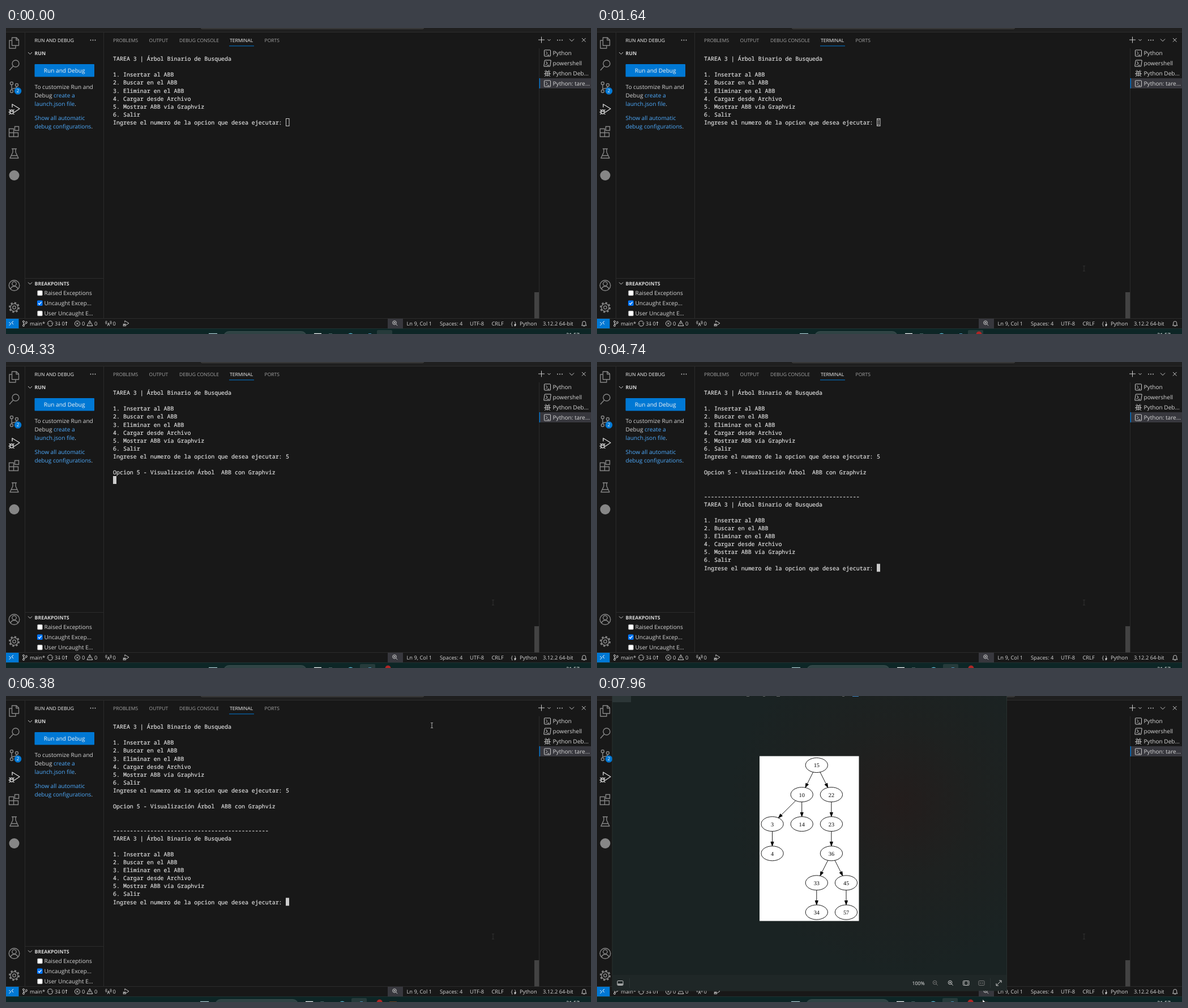
An HTML page that plays this animation: 1033 px wide and 542 px high, repeating every 8 s.

```html
<!DOCTYPE html>
<html lang="es">
<head>
<meta charset="utf-8">
<title>Terminal</title>
<style>
html, body { margin: 0; width: 100%; height: 100%; overflow: hidden; background: #181818; }
svg { display: block; width: 1033px; height: 542px; }
text { font: 10.1px "Open Sans", "Noto Sans", sans-serif; fill: #d6d6d6; white-space: pre; text-rendering: geometricPrecision; }
.tab { font-size: 8.55px; fill: #a4a4a4; }
.on { fill: #f4f4f4; }
.head { font-size: 8.8px; font-weight: 700; }
.link { fill: #4daafc; }
.bar { font-size: 9.3px; }
.mid { text-anchor: middle; }
.term { font: 9.967px "Noto Sans Mono", "DejaVu Sans Mono", monospace; fill: #e2e2e2; stroke: #e2e2e2; stroke-width: .18; }
.node { font: 10.2px "Liberation Serif", serif; fill: #000; text-anchor: middle; }
.line { fill: none; stroke: #ccc; stroke-width: 1; }
.side { fill: none; stroke: #868686; stroke-width: 1.4; }
.rule { fill: none; stroke: #2b2b2b; }

/* one loop = 8 s, so 1% = 80 ms */
.a { animation: 8s step-end infinite; }
#rec { animation-name: rec; }
#hollow { animation-name: hollow; }
#ready { animation-name: ready; }
#five { animation-name: five; }
#block5 { animation-name: block5; }
#output { animation-name: output; }
#wait { animation-name: wait; }
#menu2 { animation-name: menu2; }
#solid2 { animation-name: solid2; }
#hollow2 { animation-name: hollow2; }
#trail1 { animation-name: trail1; }
#trail2 { animation-name: trail2; }
#focusA { animation-name: focusA; }
#focusB { animation-name: focusB; }
#newApp { animation-name: newApp; }
#click1 { animation-name: click1; }
#click2 { animation-name: click2; }
#viewer { animation-name: viewer; }
#pointer { animation-name: pointer; }
#beam { animation-name: beam; }
#arrow { animation-name: arrow; }
#mouse { animation: move 8s linear infinite; }
#apps { animation: slide 8s linear infinite; }

@keyframes rec { 0% { opacity: 0 } 1.63% { opacity: .4 } 3.37% { opacity: 1 } }
@keyframes hollow { 0% { opacity: 1 } 23.1% { opacity: 0 } }
@keyframes ready { 0% { opacity: 0 } 23.1% { opacity: 1 } 36.5% { opacity: 0 } }
@keyframes five { 0% { opacity: 0 } 36.5% { opacity: 1 } }
@keyframes block5 { 0% { opacity: 0 } 36.5% { opacity: 1 } 54.1% { opacity: 0 } }
@keyframes output { 0% { opacity: 0 } 54.1% { opacity: 1 } }
@keyframes wait { 0% { opacity: 0 } 54.1% { opacity: 1 } 57.5% { opacity: 0 } }
@keyframes menu2 { 0% { opacity: 0 } 57.5% { opacity: 1 } }
@keyframes solid2 { 0% { opacity: 0 } 57.5% { opacity: 1 } 97.87% { opacity: 0 } }
@keyframes hollow2 { 0% { opacity: 0 } 97.87% { opacity: 1 } }
@keyframes trail1 { 0% { opacity: 0 } 8.8% { opacity: 1 } }
@keyframes trail2 { 0% { opacity: 0 } 85% { opacity: 1 } }
@keyframes focusA { 0% { opacity: 1 } 23.8% { opacity: 0 } }
@keyframes focusB { 0% { opacity: 0 } 23.8% { opacity: 1 } }
@keyframes newApp { 0% { opacity: 0 } 64.3% { opacity: 1 } 91.7% { opacity: .4 } }
@keyframes click1 { 0% { opacity: 0 } 22.25% { opacity: 1 } 23.87% { opacity: 0 } }
@keyframes click2 { 0% { opacity: 0 } 97.87% { opacity: 1 } 99.5% { opacity: 0 } }
@keyframes viewer { 0% { opacity: 0 } 99.5% { opacity: 1 } }
@keyframes pointer { 0% { opacity: 0 } 6% { opacity: 1 } 33.25% { opacity: 0 } 76.1% { opacity: 1 } }
@keyframes beam { 0% { opacity: 1 } 31.4% { opacity: 0 } 76.1% { opacity: 1 } 85.6% { opacity: 0 } }
@keyframes arrow { 0% { opacity: 0 } 31.4% { opacity: 1 } 76.1% { opacity: 0 } 85.6% { opacity: 1 } }
@keyframes move {
  0%, 6% { transform: translate(1003px, 536px) }
  15.25%, 16.1% { transform: translate(522px, 178px) }
  20%, 27.25% { transform: translate(497px, 167px) }
  28.5% { transform: translate(455px, 156px) }
  33.25%, 76% { transform: translate(-4px, 500px) }
  76.1% { transform: translate(738px, 30px) }
  79.7%, 80.6% { transform: translate(752px, 52px) }
  85% { transform: translate(664px, 487px) }
  86%, 100% { transform: translate(681px, 537.5px) }
}
@keyframes slide {
  0%, 57.5% { transform: none }
  59%, 62% { transform: translateX(-14px) }
  63.5%, 100% { transform: translateX(-14.8px) }
}
</style>
</head>
<body>
<svg viewBox="0 0 1033 542">
  <defs>
    <radialGradient id="tint" gradientUnits="userSpaceOnUse" cx="535" cy="190" r="300">
      <stop offset="0" stop-color="#231d1c"/><stop offset=".45" stop-color="#1e2120"/><stop offset="1" stop-color="#1a2323"/>
    </radialGradient>
    <g id="bug">
      <path d="M-4-3.500V-9L9-1 0 5" stroke-linejoin="round"/>
      <ellipse cx="-5" cy="4.500" rx="2.900" ry="3.600"/>
      <path d="M-8 3.500h6M-9.500.500l2 1.500M-.500.500l-2 1.500M-10.500 5h2.500M-2 5H.500M-9.500 9l2-1.500M-.500 9l-2-1.500"/>
    </g>
    <g id="shell"><rect x="-5.5" y="-5.5" width="11" height="11" rx="1"/><path d="M-3-3 0 0-3 3M0 3.500h3.500"/></g>
    <g id="lens"><circle r="3.300"/><path d="M2.400 2.400 5.200 5.200M-1.600 0h3.200"/></g>
  </defs>

  <rect width="1033" height="542" fill="#181818"/>
  <rect width="1033" height="7" fill="#1f1f1f"/>
  <path d="M344-2v1q0 2.500 3 2.500h388q3 0 3-2.500v-1" fill="#2a2a2a" stroke="#484848"/>
  <path class="rule" d="M0 7.500h1033M33.500 8v506M172.500 8v506M941.500 36v478M34 443.500h138M0 514.500h1033"/>

  <!-- activity bar -->
  <g class="side">
    <path d="M10.500 21v-4h8l4 4v10h-12zM18 17v4.500h4.500M10.500 22H6v14h11v-5" stroke-linejoin="round"/>
    <circle cx="17" cy="63" r="6"/><path d="M12.700 67.500 6 75"/>
    <circle cx="10" cy="98" r="2.500"/><circle cx="10" cy="112" r="2.500"/><circle cx="19" cy="101" r="2.500"/>
    <path d="M10 100.500v9M19 103.500q0 4-9 4"/>
    <path d="M5.500 178.500h8v14h-8zM5.500 185.500h16v7h-8M15.500 174.500h7v7h-7z"/>
    <path d="M10 214h9M12 214v6L7 230.500h15L17 220v-6M9.500 226h10" stroke-linejoin="round"/>
    <circle cx="14.500" cy="456" r="9.300"/><circle cx="14.500" cy="453" r="3.700"/><path d="M8 462.500q1.500-5 6.500-5t6.500 5"/>
    <circle cx="14.500" cy="495" r="2.700"/><circle cx="14.500" cy="495" r="6.600"/>
    <circle cx="14.500" cy="495" r="8.300" stroke-width="2.500" stroke-dasharray="3.260"/>
  </g>
  <use href="#bug" x="15" y="144" fill="none" stroke="#d7d7d7" stroke-width="1.400"/>
  <circle cx="14.500" cy="261" r="9" fill="#868686"/>
  <circle cx="21" cy="111.500" r="6.300" fill="#0078d4"/>

  <!-- side bar -->
  <rect x="50.500" y="64" width="105.500" height="22.500" rx="1" fill="#0078d4"/>
  <path class="line" d="M39 43l3.500 3.500L46 43M39 450.500l3.500 3.500 3.500-3.500"/>
  <g fill="#ccc"><circle cx="149.500" cy="21.500" r=".9"/><circle cx="153.500" cy="21.500" r=".9"/><circle cx="157.500" cy="21.500" r=".9"/></g>
  <g fill="#fff" stroke="#767676" stroke-width=".7">
    <rect x="55.400" y="465" width="9" height="9" rx="1.500"/><rect x="55.400" y="501" width="9" height="9" rx="1.500"/>
  </g>
  <rect x="55" y="482.500" width="9.600" height="9.600" rx="1.500" fill="#0075ff"/>
  <path d="M57 487.500l2 2 3.600-4.300" fill="none" stroke="#fff" stroke-width="1.200"/>

  <!-- panel -->
  <rect x="394" y="31.300" width="44" height="1" fill="#0078d4"/>
  <path class="line" d="M940 21h11M945.500 15.500v11M956.500 20l2.500 2.500 2.500-2.500M995 19.500l4 4 4-4M1017 18l6.500 6.500M1023.500 18l-6.500 6.500"/>
  <g fill="#ccc"><circle cx="974" cy="21.500" r=".9"/><circle cx="978" cy="21.500" r=".9"/><circle cx="982" cy="21.500" r=".9"/></g>
  <rect x="942" y="89" width="91" height="18" fill="#37373d"/>
  <rect x="941.600" y="89" width="1.400" height="18" fill="#0078d4"/>
  <g class="line">
    <use href="#shell" x="956" y="44.500"/><use href="#shell" transform="translate(956 62.500) skewX(-8)"/><use href="#shell" x="956" y="98.500"/>
    <circle cx="956" cy="81" r="3.800"/><path d="M952 81h8M956 77v8M953 74.500l1.500 2.500M959 74.500l-1.500 2.500M950 81h2M960 81h2M951 76l2 2M961 76l-2 2M951 86l2-2M961 86l-2-2"/>
  </g>
  <rect x="933" y="468" width="8" height="46.500" fill="#434343"/>

  <!-- status bar -->
  <rect y="515" width="22.500" height="17.500" fill="#0078d4"/>
  <rect x="674" y="515" width="27" height="17.500" fill="#37373d"/>
  <path class="line" style="stroke:#fff" d="M5.500 521l3 3-3 3M13 519l-3 3 3 3"/>
  <g class="line">
    <circle cx="31" cy="520" r="1.500"/><circle cx="31" cy="527" r="1.500"/><circle cx="36" cy="521.500" r="1.500"/><path d="M31 521.500v4M36 523q0 1.500-5 1.500"/>
    <path d="M73.500 523a4.500 4.500 0 0 1 8.600-1.500M82.500 524a4.500 4.500 0 0 1-8.600 1.500M83.500 522l-1.400 1.500-2-1M72.500 525l1.400-1.500 2 1"/>
    <path d="M94 520v6.500M92.200 524.800l1.800 1.800 1.800-1.800M106.500 527v-6.500M104.700 522.200l1.800-1.800 1.800 1.800"/>
    <circle cx="126" cy="523.500" r="4.600"/><path d="M124 521.500l4 4M128 521.500l-4 4"/>
    <path d="M148 518.500l5 9h-10zM148 521.500v3.500"/>
    <path d="M181 522l-2 6M181 522l2 6M180 525.500h2M178.800 524a2.600 2.600 0 0 1 0-4.500M183.200 524a2.600 2.600 0 0 0 0-4.500M177 525a5 5 0 0 1 0-6.500M185 525a5 5 0 0 0 0-6.500" stroke-width=".85"/>
    <use href="#bug" transform="translate(212 523.500) scale(.55)" stroke-width="1.800"/>
    <use href="#lens" x="686" y="522"/><path d="M686 520.400v3.200"/>
    <path d="M1016.500 527h8.500l-1.300-2v-2.500a3 3 0 0 0-6 0v2.500zM1019.500 528h2.500"/>
  </g>
  <circle cx="899" cy="526" r="1.700" fill="#ccc"/>
  <g id="labels"></g>

  <!-- terminal -->
  <g id="menu1"></g>
  <rect class="line a" id="hollow" x="494.500" y="160.500" width="5.500" height="13"/>
  <rect class="a" id="ready" x="494" y="160" width="6" height="14" fill="#ccc"/>
  <g class="a" id="five"></g>
  <rect class="a" id="block5" x="500" y="160" width="6" height="14" fill="#ccc"/>
  <g class="a" id="output"></g>
  <rect class="a" id="wait" x="189" y="202" width="6" height="14" fill="#ccc"/>
  <g class="a" id="menu2"></g>
  <rect class="a" id="solid2" x="494" y="357.500" width="6" height="14" fill="#ccc"/>
  <rect class="line a" id="hollow2" x="494.500" y="358" width="5.500" height="13"/>
  <path class="a" id="trail1" d="M858 421.500h4M860 421.500v9M858 430.500h4" fill="none" stroke="#303030"/>
  <path class="a" id="trail2" d="M659 490.500h4M661 490.500v8M659 498.500h4" fill="none" stroke="#2a2a2a"/>

  <!-- image window -->
  <g class="a" id="viewer">
    <rect x="27" y="-2" width="696.500" height="524" fill="url(#tint)" stroke="#303938" stroke-width=".7"/>
    <path d="M27 0h33v11h-33z" fill="#2c3637"/>
    <path d="M264 0h5M293 0h4M317 0h6M433 0h4" stroke="#aaa" stroke-width="1.200"/>
    <rect x="451" y="0" width="11" height="1" fill="#3f87c8"/>
    <rect x="27" y="494" width="696" height="28" fill="#1f2727"/>
    <path d="M57.500 500v17M694.500 500v17" stroke="#2c3434"/>
    <g class="line" stroke-width="1.100">
      <rect x="36" y="504.500" width="10" height="8" rx="1.200"/><path d="M36.500 510.500h9" stroke-width="2"/>
      <g stroke="#777"><use href="#lens" x="596.500" y="507.500"/><rect x="674" y="504.500" width="10" height="8" rx="1.200"/><path d="M677 507v3M681 507v3M679 507.500v.6M679 509.300v.6"/></g>
      <use href="#lens" x="623.500" y="507.500"/><path d="M623.500 505.900v3.200"/>
      <rect x="646.500" y="504.500" width="10.500" height="8" rx="1.200"/><path d="M648.500 508v-1.500h1.500M653.500 506.500h1.500v1.500M655 509v1.500h-1.500M650 510.500h-1.500v-1.500"/>
      <path d="M705 513l9-9M710 504h4v4M705 509v4h4"/>
    </g>
    <text x="556.500" y="511.500" style="font-size:8.700px;fill:#eee">100%</text>
    <rect x="287" y="106.500" width="175.500" height="292" fill="#fff"/>
    <g id="tree"></g>
  </g>

  <!-- taskbar -->
  <rect y="532.500" width="1033" height="10" fill="#0d2626"/>
  <path d="M0 532.500h1033" stroke="#263938" stroke-width=".7"/>
  <g id="apps">
    <rect x="358" y="540.800" width="15" height="2" fill="#a9cbd2"/>
    <rect x="384.500" y="537.500" width="146" height="18" rx="9" fill="#2f4344" stroke="#4b5d5e" stroke-width=".7"/>
    <rect class="a" id="focusA" x="655" y="535" width="27" height="12" rx="2" fill="#263b3b"/>
    <rect class="a" id="focusB" x="625" y="535" width="27" height="12" rx="2" fill="#263b3b"/>
    <rect x="544" y="540.700" width="13" height="2" fill="#e8eeee"/>
    <rect x="570" y="541.200" width="6" height="2" fill="#587070"/>
    <circle cx="608.500" cy="547" r="6.500" fill="#57b3cc"/>
    <rect x="640" y="541" width="5" height="2" fill="#4d8fb4"/>
    <circle class="a" id="rec" cx="674.500" cy="542.500" r="5" fill="#b02626"/>
  </g>
  <rect class="a" id="newApp" x="677" y="541" width="13" height="2" fill="#6a3d1e"/>
  <text class="bar" x="989" y="547" style="fill:#fff">21:57</text>

  <circle class="a" id="click1" cx="497" cy="167" r="8" fill="#d9cd18" opacity=".8"/>
  <circle class="a" id="click2" cx="681" cy="537" r="8" fill="#b9b014"/>
  <g class="a" id="pointer"><g id="mouse">
    <path class="a" id="beam" d="M-2-4.500h1.500L0-4l.5-.5H2M0-4v8M-2 4.500h1.500L0 4l.5.5H2" fill="none" stroke="#c4c4c4" stroke-width=".9"/>
    <path class="a" id="arrow" d="M0 0v11l2.600-2.400 1.700 3.800 1.500-.7-1.700-3.700h3.500z" fill="#fff" stroke="#222" stroke-width=".5"/>
  </g></g>
</svg>
<script>
const $ = id => document.getElementById(id);
const label = (x, y, s, cls = "") => `<text x="${x}" y="${y}" class="${cls}">${s}</text>`;

$("labels").innerHTML = [
  [50.5, 24.7, "RUN AND DEBUG", "tab on"],
  [50.5, 47.8, "RUN", "head"],
  [103.2, 79.2, "Run and Debug", "mid on"],
  [50.5, 107.8, "To customize Run and"],
  [50.5, 122.8, 'Debug <tspan class="link">create a</tspan>'],
  [50.5, 138, '<tspan class="link">launch.json file</tspan>.'],
  [50.5, 163, "Show all automatic", "link"],
  [50.5, 178.2, 'debug configurations<tspan fill="#ccc">.</tspan>', "link"],
  [50.5, 455.6, "BREAKPOINTS", "head"],
  [67.5, 473.4, "Raised Exceptions"],
  [67.5, 491.3, "Uncaught Excep..."],
  [67.5, 509.2, "User Uncaught E..."],
  [21, 114.3, "2", "tab mid on"],
  [189, 24.7, "PROBLEMS", "tab"],
  [252.5, 24.7, "OUTPUT", "tab"],
  [306, 24.7, "DEBUG CONSOLE", "tab"],
  [395, 24.7, "TERMINAL", "tab on"],
  [456.5, 24.7, "PORTS", "tab"],
  [965.5, 48.2, "Python"],
  [965.5, 66.2, "powershell"],
  [965.5, 84.2, "Python Deb..."],
  [965.5, 102.2, "Python: tare..."],
  [42, 527, "main*", "bar"],
  [86, 527, "3", "bar"],
  [98.5, 527, "0", "bar"],
  [134, 527, "0", "bar"],
  [156, 527, "0", "bar"],
  [188.5, 527, "0", "bar"],
  [707.5, 527, "Ln 9, Col 1", "bar"],
  [766, 527, "Spaces: 4", "bar"],
  [819, 527, "UTF-8", "bar"],
  [857.5, 527, "CRLF", "bar"],
  [891.5, 526.5, "{ }", "bar"],
  [907, 527, "Python", "bar"],
  [948, 527, "3.12.2 64-bit", "bar"]
].map(row => label(...row)).join("");

// terminal text on a fixed character grid
const term = (row, s, col = 0) => label(189 + col * 5.98, 58.1 + row * 14.11, s, "term");
const menu = [
  "TAREA 3 | Árbol Binario de Busqueda", "",
  "1. Insertar al ABB", "2. Buscar en el ABB", "3. Eliminar en el ABB",
  "4. Cargar desde Archivo", "5. Mostrar ABB vía Graphviz", "6. Salir",
  "Ingrese el numero de la opcion que desea ejecutar: "
];
const menuAt = row => menu.map((s, i) => term(row + i, s)).join("");
$("menu1").innerHTML = menuAt(0);
$("five").innerHTML = term(8, "5", 51);
$("output").innerHTML = term(10, "Opcion 5 - Visualización Árbol  ABB con Graphviz");
$("menu2").innerHTML = term(13, "-".repeat(46)) + menuAt(14);

// binary tree: value, column (half steps), level, parent
const RX = 19.6, RY = 13;
const nodes = [
  [15, 3, 0], [10, 2, 1, 15], [22, 4, 1, 15], [3, 0, 2, 10], [14, 2, 2, 10], [23, 4, 2, 22],
  [4, 0, 3, 3], [36, 4, 3, 23], [33, 3, 4, 36], [45, 5, 4, 36], [34, 3, 5, 33], [57, 5, 5, 45]
];
const place = {};
let tree = "";
for (const [value, col, level, parent] of nodes) {
  const x = 309.5 + col * 26.1, y = 122.5 + level * 52.1;
  place[value] = [x, y];
  tree += `<ellipse cx="${x}" cy="${y}" rx="${RX}" ry="${RY}" fill="none" stroke="#000" stroke-width=".9"/>`
    + label(x, y + 3.9, value, "node");
  if (!parent) continue;
  const [px, py] = place[parent];
  const dist = Math.hypot(x - px, y - py), ux = (x - px) / dist, uy = (y - py) / dist;
  const edge = 1 / Math.hypot(ux / RX, uy / RY);
  const at = (d, side = 0) => `${px + ux * d - uy * side} ${py + uy * d + ux * side}`;
  const tip = dist - edge, base = tip - 7.4;
  tree += `<path d="M${at(edge)}L${at(base)}M${at(tip)}L${at(base, 2.6)}L${at(base, -2.6)}z" stroke="#000" stroke-width=".9"/>`;
}
$("tree").innerHTML = tree;
</script>
</body>
</html>
```
